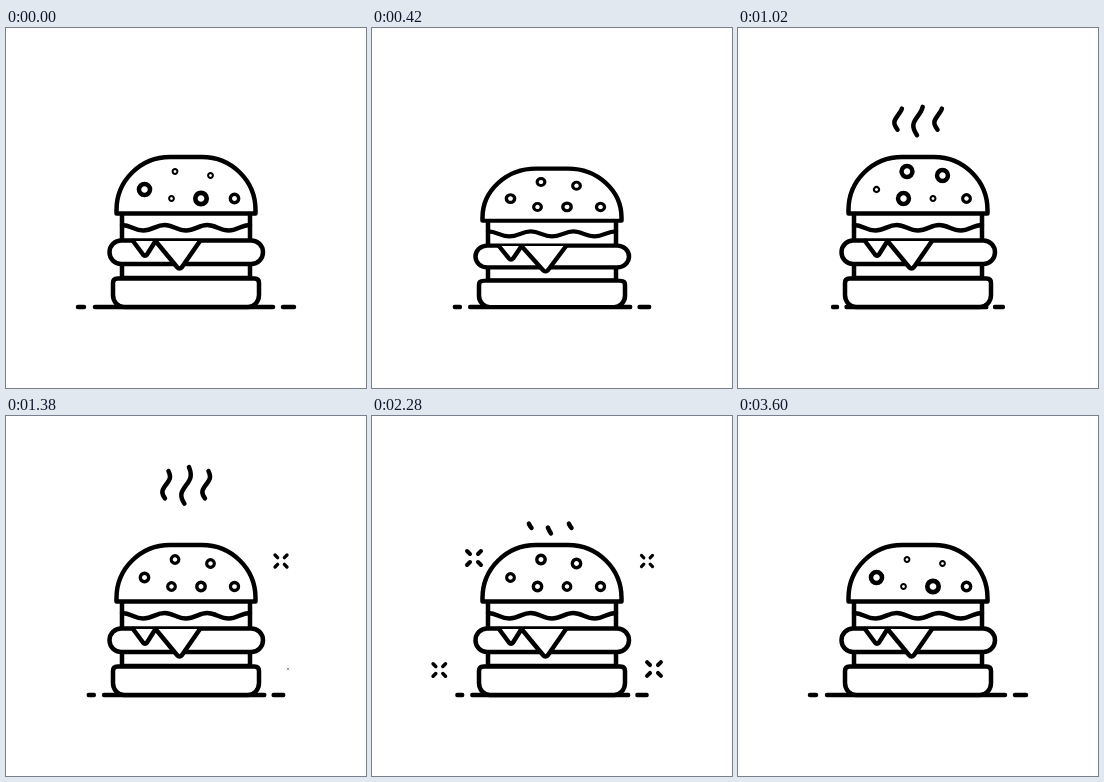
These frames come from a looping animation (360x360 px, 3.63 s). An HTML page:

```html
<!DOCTYPE html>
<html lang="en">
<head>
<meta charset="utf-8">
<title>Burger</title>
<style>
  html, body { margin: 0; width: 100%; height: 100%; overflow: hidden; background: #fff; }
  svg { display: block; width: 100%; height: 100%; }
  svg * { stroke-linecap: round; stroke-linejoin: round; }
</style>
</head>
<body>
<svg viewBox="0 0 360 360" fill="none" stroke="#000" stroke-width="4.5">
  <path id="ground" d="M-108 0h6M-91 0H87M97 0h11"/>
  <g id="burger" fill="#fff">
    <path d="M116 186V250H244V186"/>
    <path fill="none" d="M116 197C125 197 128 202.500 137.300 202.500S150 197 158.700 197S171 202.500 180 202.500S193 197 201.300 197S214 202.500 222.700 202.500S235 197 244 197"/>
    <rect x="103.5" y="212.5" width="153.5" height="23.5" rx="11.7"/>
    <path d="M127 213L137 226.500Q139 229 141 226.500L149.500 213L171 239Q173.500 242 176 239L194 213"/>
    <path d="M107 255Q107 250.500 111.500 250.500H248.500Q253 250.500 253 255V267A11 12 0 0 1 242 279H118A11 12 0 0 1 107 267Z"/>
    <path d="M110.500 185.500V182A53.500 53 0 0 1 164 129H196A53.500 53 0 0 1 249.500 182V185.500Z"/>
    <g id="seeds" stroke-width="3.3"></g>
  </g>
  <g id="steam">
    <path pathLength="1" d="M159.500 114C154.500 107.500 156 105 160 99.500S165.500 92.500 162.500 86"/>
    <path pathLength="1" d="M179 119.500C173 110.500 175 107 179.800 100.500S186.500 90.500 183 82"/>
    <path pathLength="1" d="M199.500 114C194.500 107.500 196 105 200 99.500S205.500 92.500 202.500 86"/>
  </g>
  <g id="sparkles" stroke-width="4"></g>
</svg>
<script>
const LOOP = 3630, LENGTH = 3600, PULSE = 1800;
const STEAM_STARTS = [530, 2090], STEAM_LIFE = 1500, STEAM_RISE = 51, STEAM_TRIM = .48;
const SPARKLE_LIFE = 1480;

const $ = id => document.getElementById(id);
const clamp = v => Math.min(1, Math.max(0, v));
const ease = u => (1 - Math.cos(Math.PI * clamp(u))) / 2;

function add(parent, tag, attrs) {
  const node = document.createElementNS("http://www.w3.org/2000/svg", tag);
  for (const name in attrs) node.setAttribute(name, attrs[name]);
  return parent.appendChild(node);
}

function place(node, x, y, sx, sy = sx) {
  node.setAttribute("transform", `translate(${x} ${y}) scale(${sx} ${sy})`);
}

// x, y, pulse amount
const seeds = [
  [138.5, 161.5, .38], [195, 170.5, .42], [169, 143.5, -.4],
  [204.5, 147.5, -.4], [165.5, 170.5, -.4], [228.5, 170.5, .04]
].map(([x, y, amount]) => ({ x, y, amount, node: add($("seeds"), "circle", { r: 4 }) }));

// x, y, start time
const sparkles = [
  [275, 145, 1070], [282, 253, 1350], [102, 142, 1640], [67.3, 254, 1940]
].map(([x, y, start]) => ({
  x, y, start,
  node: add($("sparkles"), "path", { d: "M-7-7l3 3M7 7l-3-3M-7 7l3-3M7-7l-3 3" })
}));

// time, vertical scale
const bounce = [[0, 1], [390, .92], [720, 1.032], [990, 1]];

function stretch(t) {
  let scale = 1;
  for (let i = 1; i < bounce.length; i++) {
    const [t0, a] = bounce[i - 1], [t1, b] = bounce[i];
    scale += (b - a) * ease((t - t0) / (t1 - t0));
  }
  return scale;
}

function drawSteam(t) {
  const start = STEAM_STARTS.findLast(s => t >= s) ?? Infinity;
  const u = (t - start) / STEAM_LIFE;
  const visible = u > 0 && u < 1;
  $("steam").style.display = visible ? "" : "none";
  if (!visible) return;
  const head = ease(u / STEAM_TRIM), tail = ease((u - 1) / STEAM_TRIM + 1);
  place($("steam"), 0, -STEAM_RISE * ease(u), 1);
  $("steam").setAttribute("stroke-dasharray", `${head - tail} 2`);
  $("steam").setAttribute("stroke-dashoffset", -tail);
}

function draw(t) {
  const wave = Math.cos(2 * Math.PI * t / PULSE);
  place($("ground"), 180, 279, .89 + .11 * wave, 1);
  const sy = stretch(t);
  place($("burger"), 0, 279 * (1 - sy), 1, sy);
  for (const s of seeds) place(s.node, s.x, s.y, 1 + s.amount * wave);
  for (const s of sparkles) {
    const u = clamp((t - s.start) / SPARKLE_LIFE);
    place(s.node, s.x, s.y, 1 - (1 - Math.sin(Math.PI * u)) ** 2);
    s.node.style.display = u > 0 && u < 1 ? "" : "none";
  }
  drawSteam(t);
}

function tick() {
  draw(Math.min(performance.now() % LOOP, LENGTH));
  requestAnimationFrame(tick);
}
tick();
</script>
</body>
</html>
```
